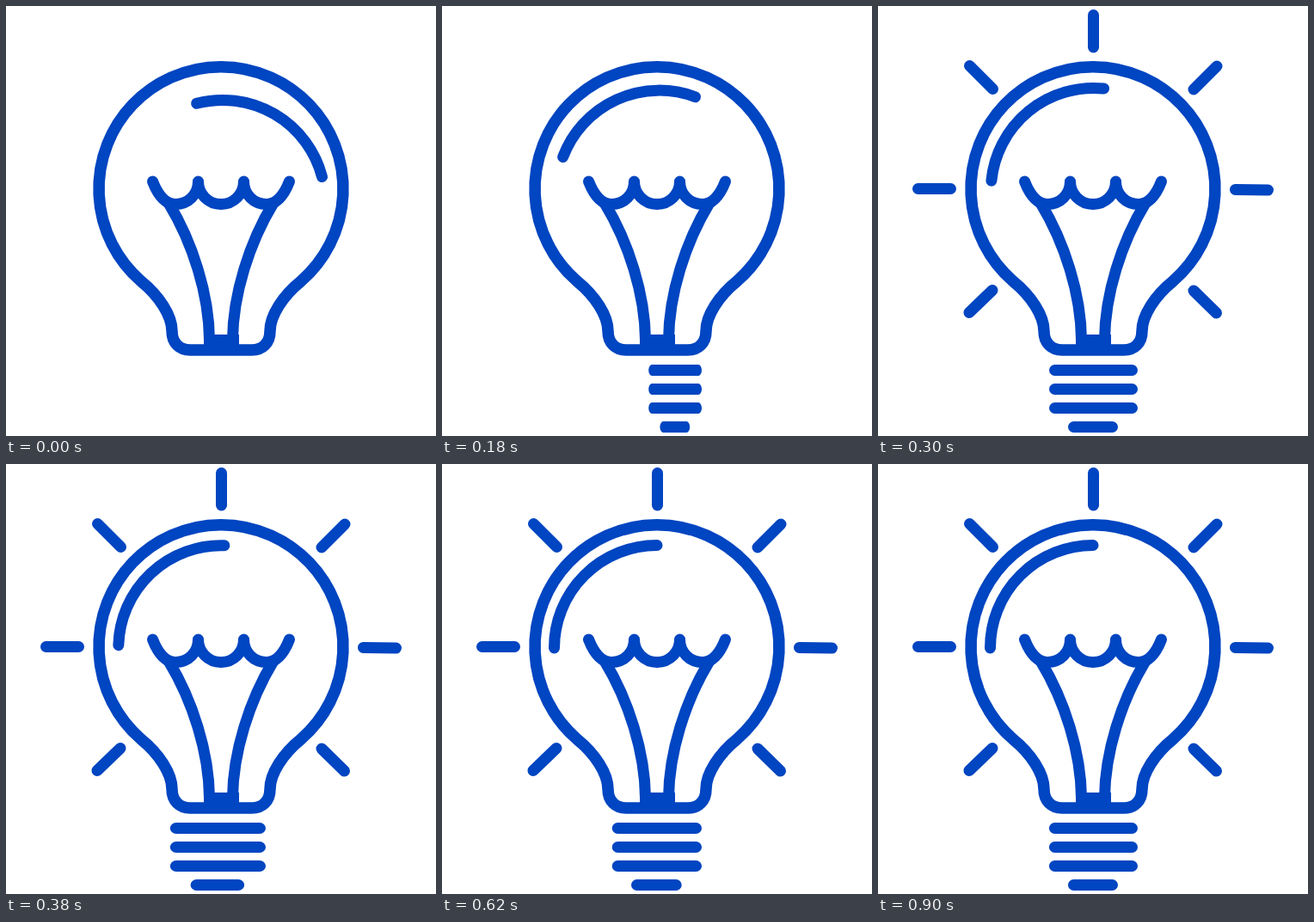
An HTML page that plays this animation: 500 px wide and 500 px high, repeating every 1.2 s.

```html
<!DOCTYPE html>
<html lang="en">
<head>
<meta charset="utf-8">
<title>Light bulb</title>
<style>
  html, body { margin: 0; height: 100%; overflow: hidden; background: #fff; }
  svg { display: block; width: 100%; height: 100%; }
</style>
</head>
<body>
<svg viewBox="0 0 500 500" fill="none" stroke="#0045c1" stroke-width="13" stroke-linecap="round" stroke-linejoin="round">
  <path stroke-width="13.5" d="M157 320A142 142 0 1 1 343 320C322 337 307 360 307 378C307 392 298 400 286 400H214C202 400 193 392 193 378C193 360 178 337 157 320Z"/>
  <path d="M170.500 204C176 218 184 230.500 197 230.500C212 230.500 223.500 219 223.500 204A26.500 26.500 0 0 0 276.500 204C276.500 219 288 230.500 303 230.500C316 230.500 324 218 329.500 204"/>
  <path d="M189 229C217 275 236 335 236.500 388M311 229C283 275 264 335 263.500 388"/>
  <path fill="#0045c1" stroke="none" d="M230 382H271V400H230Z"/>
  <path id="shine" d="M130.500 214A119.500 119.500 0 0 1 250 94.500"/>
  <g id="rays">
    <path pathLength="1" d="M250.500 48V10.500"/>
    <path pathLength="1" d="M133.500 96.500L106.500 69.500"/>
    <path pathLength="1" d="M367 97L394 70"/>
    <path pathLength="1" d="M84.500 212.500H46.500"/>
    <path pathLength="1" d="M415.500 213.500L453.500 214"/>
    <path pathLength="1" d="M133 330.500L106 356.500"/>
    <path pathLength="1" d="M367 331L393.500 357"/>
  </g>
  <path id="bars" d="M205.500 423.500H295.500M205.500 445.500H295.500M205.500 467.500H295.500M227.500 489.500H272.500"/>
</svg>
<script>
  const LOOP = 1200;
  const [shine, rays, bars] = ['shine', 'rays', 'bars'].map(id => document.getElementById(id));
  const clamp = x => Math.min(1, Math.max(0, x));

  // cubic-bezier(1/3, 0, 0, 1), solved by bisection
  function ease(x) {
    let lo = 0, hi = 1;
    for (let i = 0; i < 24; i++) {
      const s = (lo + hi) / 2;
      if (s * (1 - s) ** 2 + s ** 3 < x) lo = s; else hi = s;
    }
    return lo * lo * (3 - 2 * lo);
  }

  // Linear growth, then a damped oscillation fed by the final speed
  function spring(ms) {
    if (ms < 300) return ms / 300;
    const t = (ms - 300) / 1000;
    return 1 + 0.05 / 0.3 * Math.sin(8 * Math.PI * t) * Math.exp(-8 * t);
  }

  function draw(now) {
    const t = now % LOOP;
    const angle = 75.3 * (1 - ease(clamp(t / 500)));
    shine.setAttribute('transform', `rotate(${angle} 241.3 222.7)`);

    const grow = clamp((t - 200) / 100);
    rays.setAttribute('visibility', grow > 0 ? 'visible' : 'hidden');
    rays.setAttribute('stroke-dasharray', grow < 1 ? `${grow} 2` : 'none');

    bars.setAttribute('transform', `translate(302 0) scale(${spring(t)} 1) translate(-302 0)`);
  }

  let start;
  function tick(now) {
    start ??= now;
    draw(now - start);
    requestAnimationFrame(tick);
  }
  draw(0);
  requestAnimationFrame(tick);
</script>
</body>
</html>
```
